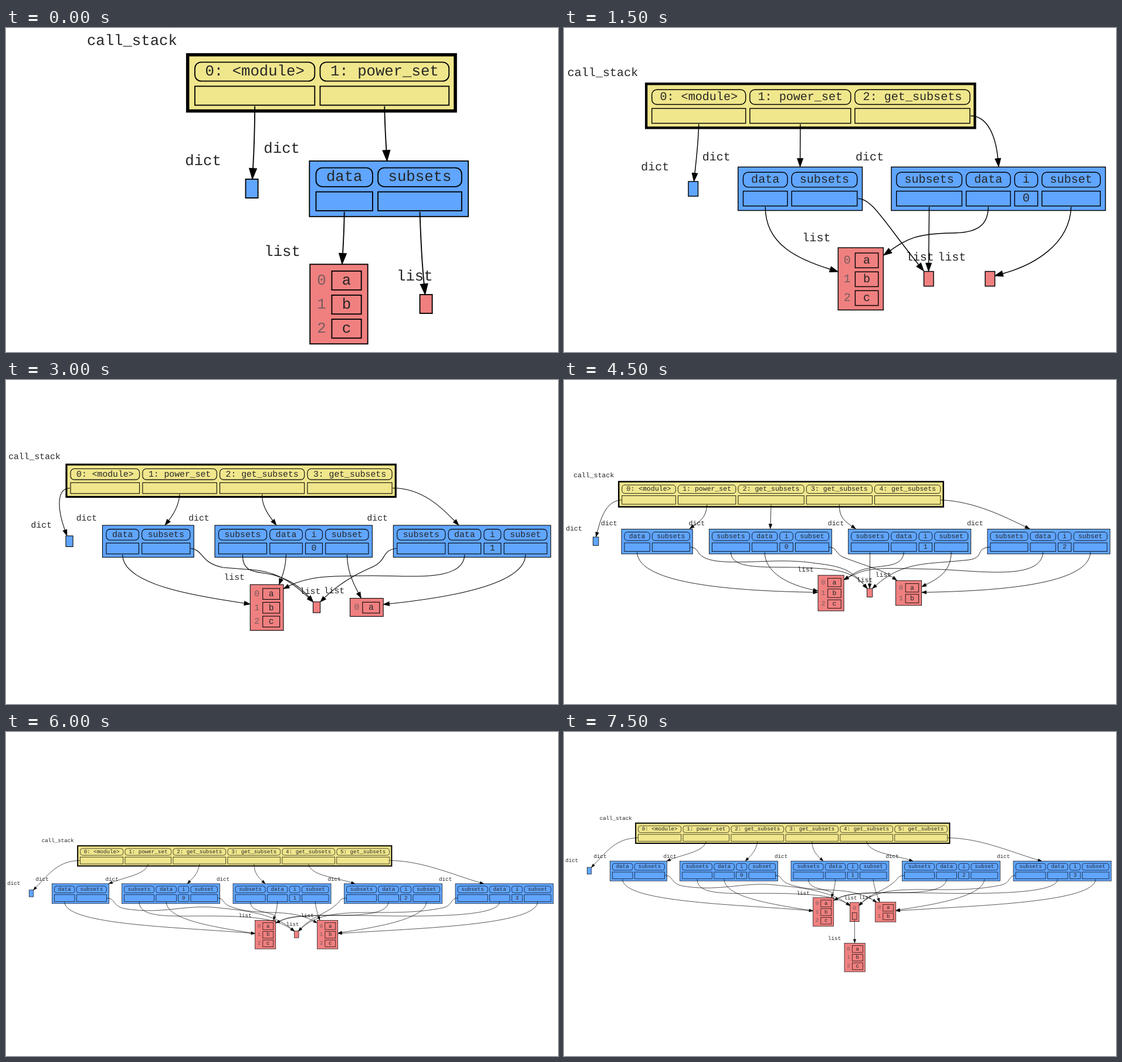
Write an HTML page that moves like this. It is 941 by 553 pixels and loops after 8 s.

```html
<!DOCTYPE html>
<html lang="en">
<head>
<meta charset="utf-8">
<title>Call stack of a recursive function</title>
<style>
  html, body { margin: 0; width: 100%; height: 100%; overflow: hidden; background: #fff; }
  svg { display: block; width: 100vw; height: 100vh; }
  text { font-family: "Liberation Mono", "Courier New", monospace; text-anchor: middle; fill: #262626; text-rendering: geometricPrecision; }
  .index { fill: #505050; fill-opacity: .75; }
  .line { fill: none; stroke: #000; }
</style>
</head>
<body>
<svg id="stage" viewBox="0 0 941 553"></svg>
<script>
const stage = document.getElementById('stage');
const YELLOW = '#f0e68c', BLUE = '#60a5ff', RED = '#f08080';
const CHAR = 8.4, CELL_H = 17.6, ROW = 22.4, GAP = 5, PAD = 6.1, TOP = 6.3;
const STEP = 1500, LOOP = 8000;

function add(parent, tag, attrs, text) {
  const el = document.createElementNS('http://www.w3.org/2000/svg', tag);
  for (const key in attrs) el.setAttribute(key, attrs[key]);
  if (text !== undefined) el.textContent = text;
  parent.appendChild(el);
  return el;
}

// All measures are multiples of the unit u.
function diagram(u, shift = 0) {
  const g = add(stage, 'g', { transform: `translate(0 ${shift})`, visibility: 'hidden' });

  const rect = (x, y, w, h, fill, line = 1, r = 0) => add(g, 'rect', {
    x, y, width: w * u, height: h * u, rx: r * u, fill, stroke: '#000', 'stroke-width': line * u });

  const write = (x, y, text, cls = '') =>
    add(g, 'text', { x, y, 'font-size': 14 * u, class: cls }, text);

  const label = (x, y, text, dx = -25.7, dy = -12.2) =>
    write(x + dx * u, y + (dy + 4.4) * u, text);

  const port = (x, y, w, h = CELL_H) => ({
    b: [x + w * u / 2, y + (h + 1) * u],
    l: [x - u, y + h * u / 2],
    r: [x + (w + 1) * u, y + h * u / 2]
  });

  // Names on top, values below; returns the ports of the lower cells.
  function table(x, y, names, values, fill, line, pad) {
    const widths = names.map(n => n.length * CHAR + 19);
    const inner = widths.reduce((a, b) => a + b + GAP);
    const extra = pad - PAD;
    rect(x, y, inner + 2 * PAD + (extra ? .4 : 0), 51.7 + extra, fill, line);
    let cx = x + pad * u;
    const cy = y + (TOP + extra) * u;
    return names.map((name, i) => {
      const w = widths[i], low = cy + ROW * u, mid = cx + w * u / 2;
      rect(cx, cy, w, CELL_H, 'none', 1, 5.8);
      write(mid, cy + 12.4 * u, name);
      rect(cx, low, w, CELL_H, 'none');
      if (values[name] !== undefined) write(mid, low + 12.4 * u, values[name]);
      const p = port(cx, low, w);
      cx += (w + GAP) * u;
      return p;
    });
  }

  function stack(x, y, count) {
    const names = ['0: <module>', '1: power_set'];
    while (names.length < count) names.push(names.length + ': get_subsets');
    label(x, y, 'call_stack', -51.7, -13.4);
    return table(x, y, names, {}, YELLOW, 3, 6.7);
  }

  function scope(x, y, i) {
    label(x, y, 'dict');
    return table(x, y, i === undefined ? ['data', 'subsets'] : ['subsets', 'data', 'i', 'subset'],
      { i }, BLUE, 1, PAD);
  }

  function empty(x, y, type, dx = -39.5) {
    rect(x, y, 11.5, 17.5, type === 'dict' ? BLUE : RED);
    label(x, y, type, dx, -17.6);
  }

  function list(x, y, items) {
    rect(x, y, 53.7, TOP + ROW * items.length - GAP + 5.6, RED);
    [...items].forEach((item, i) => {
      const cy = y + (TOP + ROW * i) * u, cx = x + 20.3 * u;
      write(x + 10.8 * u, cy + 12.4 * u, i, 'index');
      rect(cx, cy, 27.4, CELL_H, 'none');
      write(cx + 13.7 * u, cy + 12.4 * u, item);
    });
    label(x, y, 'list');
  }

  function nest(x, y) {
    rect(x, y, 23.7, 50, RED);
    write(x + 11.85 * u, y + 18 * u, 0, 'index');
    rect(x + PAD * u, y + 26.6 * u, 11.5, CELL_H, 'none');
    label(x, y, 'list', 1.5);
    return port(x + PAD * u, y + 26.6 * u, 11.5);
  }

  // Curve through control points, ending in an arrowhead at the tip.
  function link(begin, tip, bends = '') {
    const pts = bends ? bends.split(' ').map(Number) : [...begin, ...begin];
    const [x, y] = tip, [px, py] = pts.slice(-2);
    const d = Math.hypot(x - px, y - py);
    const ax = (x - px) / d * u, ay = (y - py) / d * u;
    const bx = x - ax * 10, by = y - ay * 10;
    add(g, 'path', { class: 'line', 'stroke-width': u, d: `M${begin}C${pts} ${bx} ${by}` });
    add(g, 'path', { stroke: '#000', 'stroke-width': u * .6,
      d: `M${x} ${y}L${bx - ay * 3.5} ${by + ax * 3.5}L${bx + ay * 3.5} ${by - ax * 3.5}Z` });
  }

  return { g, stack, scope, empty, list, nest, link };
}

function twoCalls() {
  const { g, stack, scope, empty, list, link } = diagram(1.834);
  const s = stack(309.7, 45.7, 2), a = scope(517.3, 227);
  empty(408.5, 258, 'dict');
  list(518.2, 403.3, 'abc');
  empty(705.5, 455, 'list', -4.7);
  link(s[0].b, [420, 258], '424 172 423 205');
  link(s[1].b, [649.5, 227], '645.5 160 647 185');
  link(a[0].b, [573, 403], '576.5 340 575.5 360');
  link(a[1].b, [714.5, 455], '707 360 710 410');
  return g;
}

function threeCalls() {
  const { g, stack, scope, empty, list, link } = diagram(1.435);
  const s = stack(140.2, 95.3, 3), a = scope(296.7, 237.3), b = scope(558, 237.3, 0);
  empty(212, 262, 'dict');
  list(467.3, 375, 'abc');
  empty(613.5, 415.5, 'list', -4.7);
  empty(718, 415.5, 'list');
  link(s[0].b, [221.5, 262], '229 195 226 220');
  link(s[1].b, [402.5, 237]);
  link(s[2].r, [741, 237], '722 150 736 185');
  link(a[0].b, [467.5, 416], '343 370 400 395');
  link(a[1].r, [613.5, 415], '525 291 545 330');
  link(b[0].b, [621.5, 415.5]);
  link(b[1].b, [544.5, 388], '723 340 700 350 660 350 600 351 585 360');
  link(b[3].b, [734, 423], '862 370 800 405');
  return g;
}

function fourCalls() {
  const { g, stack, scope, empty, list, link } = diagram(1.055);
  const s = stack(103, 144.3, 4), a = scope(164.5, 248);
  const b = scope(356, 248, 0), c = scope(660.3, 248, 1);
  empty(102, 266, 'dict');
  list(416.3, 349.2, 'abc');
  empty(523.5, 378.7, 'list', -4.7);
  list(586.5, 372.6, 'a');
  link(s[0].l, [104, 266], '85 185 88 222');
  link(s[1].b, [271, 248], '295 212 288 226');
  link(s[2].b, [461, 248], '436 212 444 226');
  link(s[3].r, [772, 248], '710 184 745 220');
  link(a[0].b, [416.5, 382.5], '198 350 330 370');
  link(a[1].r, [523.5, 379], '338 290 330 312 370 320 430 326 460 318');
  link(b[0].b, [523.5, 378], '402 335 435 325 460 334 485 342 500 352');
  link(b[1].b, [465.5, 349.5], '477 315 474 327');
  link(b[3].b, [605.5, 372.5], '582 325 590 343');
  link(c[0].l, [535.5, 379], '640 290 650 308 625 319 590 334 565 350');
  link(c[1].b, [472.5, 356.5], '780 345 690 334 625 334 550 334 515 335');
  link(c[3].b, [643, 383], '885 350 750 372');
  return g;
}

function fiveCalls() {
  const { g, stack, scope, empty, list, link } = diagram(.8215);
  const s = stack(93.3, 173.5, 5), a = scope(98, 254.4);
  const [b, c, d] = [0, 1, 2].map(i => scope(247.5 + 237.2 * i, 254.4, i));
  const trio = [477, 341];
  empty(49.5, 268, 'dict');
  list(433, 333.2, 'abc');
  empty(516.5, 356, 'list', -4.7);
  list(565.5, 342.3, 'ab');
  link(s[0].l, [54.5, 268], '70 206 62 240');
  link(s[1].b, [214, 254], '243 235 230 242');
  link(s[2].b, [351.7, 254]);
  link(s[3].b, [497.5, 254], '469 235 480 242');
  link(s[4].r, [794, 254], '700 207 752 234');
  link(a[0].b, [433, 362.5], '125 350 300 360');
  link(a[1].r, [517, 356], '235 287 220 303 260 309 310 315 370 303 430 313 475 318 490 325');
  link(b[0].b, [517, 356], '284 325 345 318 400 320 460 322 490 325');
  link(b[1].b, [433, 360], '342 330 385 350');
  link(b[3].r, [567.5, 342], '465 286 463 296 475 302 520 320 540 322');
  link(c[0].b, [521, 356]);
  link(c[1].b, trio, '578 320 545 316 520 321 500 325 495 330');
  link(c[3].b, [609.5, 353], '660 325 640 338');
  link(d[0].l, [525.5, 356], '700 287 718 303 690 307 620 315 580 308');
  link(d[1].b, trio, '815 345 700 324 630 323 540 321 520 318');
  link(d[3].b, [609.5, 362.5], '897 350 735 360');
  return g;
}

// Two steps share this layout; in the later one the result holds a list.
function sixCalls(stored) {
  const { g, stack, scope, empty, list, nest, link } = diagram(.6565, stored ? -38.7 : 0);
  const s = stack(122.2, 194.3, 6), a = scope(78.5, 258.9);
  const [b, c, d, e] = [0, 1, 2, 3].map(i => scope(197.5 + 189.5 * i, 258.9, i));
  const left = stored ? [487.5, 335] : [491.5, 340], right = stored ? [503, 335] : [498.5, 340];
  const trio = [460, 326];
  empty(39.3, 269.7, 'dict');
  list(424.5, 321.5, 'abc');
  if (stored) {
    list(530.5, 328.9, 'ab');
    list(478, 399.2, 'abc');
    link(nest(487.5, 329.6).b, [495.5, 399]);
  } else {
    list(530.5, 321.5, 'abc');
    empty(491.5, 339.7, 'list', -4.7);
  }
  link(s[0].l, [46.5, 270], '90 220 75 240');
  link(s[1].b, [175, 259], '238 243 205 247');
  link(s[2].b, [309, 259], '328 240 320 248');
  link(s[3].b, [442, 259], '423 240 430 248');
  link(s[4].b, [595, 259], '520 245 560 248');
  link(s[5].r, [814.5, 259], '710 220 760 243');
  link(a[0].b, [424.5, 344], '100 330 300 333');
  link(a[1].r, left, '188 284 180 298 205 302 270 312 310 292 370 301 440 307 470 322');
  link(b[0].b, left, '227 318 280 314 340 314 420 314 460 318');
  link(b[1].b, [424.5, 344], '274 320 350 332');
  link(b[3].r, stored ? [533, 329] : [530.5, 326], '372 284 368 291 380 297 430 317 480 298');
  link(c[0].b, left, '418 308 440 304 460 314');
  link(c[1].b, [456, 321.5], '462 302 460 308');
  link(c[3].b, stored ? [538, 329] : [535, 321.5], '528 300 531 310');
  link(d[0].l, right, '568 284 570 290 560 297 545 310 520 316');
  link(d[1].b, trio, '650 318 570 312 530 313 495 314 480 316');
  link(d[3].b, [566, 343], '715 318 640 332');
  link(e[0].l, right, '757 284 762 296 745 300 650 320 550 290');
  link(e[1].b, trio, '840 322 650 313 580 313 510 313 485 314');
  link(e[3].b, [566, 344], '905 330 700 335');
  return g;
}

const scenes = [twoCalls(), threeCalls(), fourCalls(), fiveCalls(), sixCalls(false), sixCalls(true)];
const start = performance.now();

function show(time) {
  const now = Math.floor(time % LOOP / STEP);
  scenes.forEach((g, i) => g.setAttribute('visibility', i === now ? 'visible' : 'hidden'));
}

function tick() {
  show(performance.now() - start);
  requestAnimationFrame(tick);
}
tick();
</script>
</body>
</html>
```
